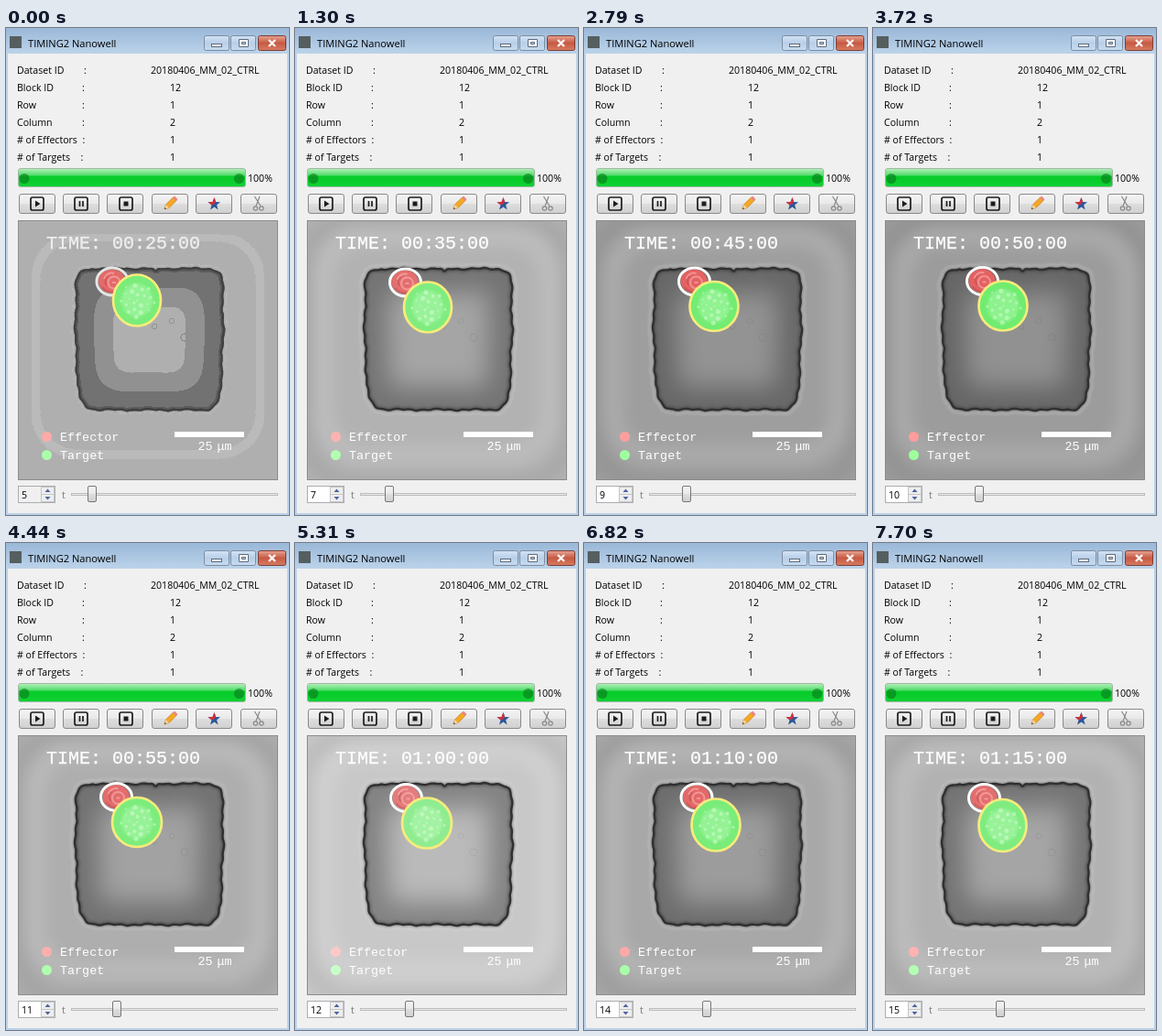
Write an HTML page that moves like this. It is 309 px wide and 532 px high and loops after 8 s.

```html
<!DOCTYPE html>
<html lang="en">
<head>
<meta charset="utf-8">
<title>Nanowell viewer</title>
<style>
  html, body { margin: 0; width: 100%; height: 100%; overflow: hidden; background: #f0f0f0; }
  svg { display: block; width: 309px; height: 532px; }
  text { font: 10.6px "Open Sans", sans-serif; fill: #000; white-space: pre; }
  .mono text { font: 13.4px "Liberation Mono", monospace; fill: #fff; }
  .mono #clock { font-size: 20px; stroke: #fff; stroke-width: .25; }
</style>
</head>
<body>
<svg viewBox="0 0 309 532">
  <defs>
    <linearGradient id="titleFill" x2="0" y2="1">
      <stop stop-color="#9ab8d8"/><stop offset="1" stop-color="#bcd3ea"/>
    </linearGradient>
    <linearGradient id="blueButton" x2="0" y2="1">
      <stop stop-color="#d5e4f4"/><stop offset=".5" stop-color="#b8cfe8"/><stop offset="1" stop-color="#c8dcf0"/>
    </linearGradient>
    <linearGradient id="redButton" x2="0" y2="1">
      <stop stop-color="#e7a493"/><stop offset=".5" stop-color="#c75a43"/><stop offset="1" stop-color="#d67c62"/>
    </linearGradient>
    <linearGradient id="grayButton" x2="0" y2="1">
      <stop stop-color="#f4f4f4"/><stop offset=".5" stop-color="#e9e9e9"/><stop offset=".52" stop-color="#dddddd"/><stop offset="1" stop-color="#d0d0d0"/>
    </linearGradient>
    <linearGradient id="barFill" x2="0" y2="1">
      <stop stop-color="#b5f0bd"/><stop offset=".38" stop-color="#50dc68"/><stop offset=".42" stop-color="#06cc28"/><stop offset="1" stop-color="#10d034"/>
    </linearGradient>
    <filter id="hazy" x="-10%" y="-10%" width="120%" height="120%"><feGaussianBlur stdDeviation=".6"/></filter>
    <filter id="soft" x="-10%" y="-10%" width="120%" height="120%"><feGaussianBlur stdDeviation="1.6"/></filter>
    <filter id="softer" x="-15%" y="-15%" width="130%" height="130%"><feGaussianBlur stdDeviation="8"/></filter>
    <filter id="softest" x="-40%" y="-40%" width="180%" height="180%"><feGaussianBlur stdDeviation="14"/></filter>
    <filter id="banded" color-interpolation-filters="sRGB">
      <feComponentTransfer>
        <feFuncR type="discrete" tableValues=".2 .25 .3 .36 .45 .57 .69 .73 .78 .85"/>
        <feFuncG type="discrete" tableValues=".2 .25 .3 .36 .45 .57 .69 .73 .78 .85"/>
        <feFuncB type="discrete" tableValues=".2 .25 .3 .36 .45 .57 .69 .73 .78 .85"/>
      </feComponentTransfer>
    </filter>
    <clipPath id="view"><rect x="14" y="211" width="282" height="282"/></clipPath>
    <clipPath id="inWell"><path class="well"/></clipPath>
    <path id="wellBase" d="M94 263H220Q236 263 236 279L237 330 234 398Q232 417 214 417H104Q82 417 79 396L76 335 77 280Q78 263 94 263Z"/>
  </defs>

  <!-- window -->
  <rect width="309" height="532" fill="#b9d1ea"/>
  <rect width="309" height="28" fill="url(#titleFill)"/>
  <rect x="2" y="28" width="305" height="502" fill="#f0f0f0"/>
  <rect x="4" y="9" width="13" height="13" fill="#555f5f"/>
  <text x="24" y="21" style="font-size:11.1px">TIMING2 Nanowell</text>
  <g stroke="#7b8da3">
    <rect x="216.500" y="8.500" width="27" height="16" rx="2" fill="url(#blueButton)"/>
    <rect x="245.500" y="8.500" width="27" height="16" rx="2" fill="url(#blueButton)"/>
    <rect x="275.500" y="8.500" width="30" height="16" rx="2" fill="url(#redButton)" stroke="#7f3d33"/>
  </g>
  <rect x="224.500" y="17.500" width="11" height="3" fill="#fff" stroke="#5d6b7c"/>
  <path d="M254.500 12.500h10v8h-10zM257.500 15.500h4v2h-4z" fill="#fff" fill-rule="evenodd" stroke="#5d6b7c"/>
  <path d="M287 13l7 7m0-7l-7 7" stroke="#fff" stroke-width="2.200"/>

  <g id="info"></g>

  <!-- progress -->
  <rect x="13.500" y="153.500" width="248" height="20" rx="2.500" fill="url(#barFill)" stroke="#a4b8a7"/>
  <g fill="#087f1d" opacity=".65" filter="url(#hazy)">
    <ellipse cx="20" cy="164.500" rx="5.500" ry="5.500"/><ellipse cx="254.500" cy="164.500" rx="5.500" ry="5.500"/>
  </g>
  <text x="264" y="168">100%</text>

  <!-- toolbar -->
  <g id="buttons"></g>
  <g fill="none" stroke="#1c1c1c" stroke-width="1.700">
    <rect x="27" y="185" width="14" height="14" rx="2"/>
    <rect x="75" y="185" width="14" height="14" rx="2"/>
    <rect x="124" y="185" width="14" height="14" rx="2"/>
    <path d="M80.500 189v6m3.500-6v6"/>
  </g>
  <path d="M32 188.500l5.500 3.500-5.500 3.500zM128.500 189.500h5v5h-5z" fill="#1c1c1c"/>
  <path d="M173 198l1.500-5 8-8 3.500 3.500-8 8z" fill="#f7a823" stroke="#b97818" stroke-width=".7"/>
  <path d="M182 185.500l2-2 3.500 3.500-2 2z" fill="#e98484"/>
  <path d="M173 198l1.500-5 3.500 3.500z" fill="#f0d2a0"/><path d="M173 198l.6-2 1.400 1.400z" fill="#333"/>
  <path d="M227.500 185l1.600 5 5 .2-4 3 1.500 5.300-4.100-3-4.500 3 1.500-5.300-4-3 5-.2z" fill="#2b5797"/>
  <path d="M227.500 185l1.600 5-2 2.500-2.600.7-4-3 5-.2z" fill="#d22f3c"/>
  <g fill="none" stroke="#888" stroke-width="1.200">
    <path d="M271.500 184l6.500 10.500m-1-10.500l-4 10.500"/>
    <circle cx="272.500" cy="197" r="2.200"/><circle cx="279" cy="197" r="2.200"/>
  </g>

  <!-- microscope view -->
  <rect x="13.500" y="210.500" width="283" height="283" fill="#aaa" stroke="#8c8c8c"/>
  <g clip-path="url(#view)">
    <g id="field">
      <rect id="ground" x="14" y="211" width="282" height="282"/>
      <rect x="10" y="207" width="290" height="290" rx="55" fill="none" stroke="#000" stroke-width="12" opacity=".08" filter="url(#softer)"/>
      <rect x="32" y="228" width="246" height="238" rx="45" fill="none" stroke="#fff" stroke-width="22" opacity=".13" filter="url(#softer)"/>
      <path class="well" fill="none" stroke="#fff" stroke-width="9" opacity=".35" filter="url(#soft)"/>
      <path id="floor" class="well"/>
      <g clip-path="url(#inWell)">
        <path class="well" fill-opacity=".07"/>
        <path class="well" fill="none" stroke="#000" stroke-width="48" opacity=".3" filter="url(#softest)"/>
      </g>
      <path class="well" fill="none" stroke="#222" stroke-width="5" opacity=".4" filter="url(#soft)"/>
      <path class="well" fill="none" stroke="#303030" stroke-width="2.400" filter="url(#hazy)"/>
      <g fill="none" stroke="#000" opacity=".06">
        <circle cx="195" cy="338" r="4"/><circle cx="181" cy="320" r="3"/><circle cx="162" cy="326" r="3"/>
      </g>
    </g>
    <g id="effector">
      <ellipse class="body" cx="-.5" cy="-.5" rx="14.500" ry="13"/>
      <g fill="none" stroke="#ffc4c4" stroke-width="2" opacity=".5" filter="url(#hazy)">
        <circle cx="2" cy="1" r="6.500"/><path d="M-9-3q4-8 11-6M0 1h4"/>
      </g>
      <path d="M-11 6q6 7 14 5M-5-6q-5 5-1 10" fill="none" stroke="#a53c3c" stroke-width="1.500" opacity=".4" filter="url(#hazy)"/>
      <ellipse class="rim" rx="17" ry="15" fill="none" stroke="#fff" stroke-width="3"/>
    </g>
    <g id="target">
      <ellipse class="body" rx="26" ry="27"/>
      <ellipse rx="17" ry="18" fill="#c8ffc8" opacity=".35" filter="url(#soft)"/>
      <g id="specks" fill="#e0ffe0" opacity=".45" filter="url(#hazy)"></g>
      <ellipse class="rim" rx="26" ry="27" fill="none" stroke="#f7ec7c" stroke-width="2.700"/>
    </g>
    <g class="mono">
      <text id="clock" x="44" y="241"></text>
      <circle id="redDot" cx="44.500" cy="446.500" r="5.500"/>
      <circle id="greenDot" cx="44.500" cy="466.500" r="5.500"/>
      <text x="59" y="451">Effector</text>
      <text x="59" y="471">Target</text>
      <rect x="184" y="441" width="76" height="6" fill="#fff"/>
      <text x="209.500" y="461">25</text><text x="230.500" y="461">μm</text>
    </g>
  </g>

  <!-- step selector -->
  <rect id="stepBox" x="13.500" y="500.500" width="40" height="18" stroke="#abadb3"/>
  <g fill="#eee" stroke="#c5c5c5">
    <rect x="38.500" y="501.500" width="14" height="8"/><rect x="38.500" y="509.500" width="14" height="8"/>
  </g>
  <path d="M42.500 507l3-3.500 3 3.500zM42.500 512l3 3.500 3-3.500z" fill="#4c62a0"/>
  <text id="step" x="17" y="514"></text>
  <text x="61" y="514" style="fill:#777">t</text>
  <rect x="71.500" y="508.500" width="225" height="2" fill="#e7eaea" stroke="#bcbcbc"/>
  <rect id="handle" y="500.500" width="9" height="17" rx="1.500" fill="url(#grayButton)" stroke="#777"/>
</svg>
<script>
const $ = selector => document.querySelector(selector);
const LOOP = 8000, FIRST_STEP = 5, MINUTES_PER_STEP = 5;

// start ms, gray level, effector x y, target x y, target radii
const steps = [
  [0, 170, 116, 277, 143, 297.5, 26, 28],
  [430, 172, 118, 277.5, 144, 301.5, 26, 28],
  [1300, 178, 120.5, 278, 145, 305, 26, 27.5],
  [2020, 162, 121.5, 277, 141.5, 304.5, 26.5, 27],
  [2790, 158, 120.5, 277, 142, 304, 26.5, 27],
  [3720, 156, 119.5, 276.5, 142, 303.5, 26.5, 27],
  [4440, 174, 120.5, 277.5, 143, 305, 27, 27],
  [5310, 200, 121.5, 278.5, 144, 306, 27, 27.5],
  [6050, 158, 124.5, 277.5, 146, 307, 27, 28],
  [6820, 168, 123, 278, 144, 308, 26.5, 28.5],
  [7700, 178, 121.5, 278.5, 141.5, 308.5, 26, 28.5]
];

const infoRows = [
  ["Dataset ID", 85, "20180406_MM_02_CTRL", 158],
  ["Block ID", 83, "12", 179],
  ["Row", 83, "1", 179],
  ["Column", 83, "2", 179],
  ["# of Effectors", 83.5, "1", 179],
  ["# of Targets", 81.5, "1", 179]
];
$("#info").innerHTML = infoRows.map(([label, colonX, value, valueX], i) => {
  const y = 50 + 19 * i;
  return `<text x="12" y="${y}">${label}</text><text x="${colonX}" y="${y}">:</text><text x="${valueX}" y="${y}">${value}</text>`;
}).join("");

$("#buttons").innerHTML = Array.from({ length: 6 }, (_, i) =>
  `<rect x="${Math.floor(14 + 48.4 * i) + 0.5}" y="181.5" width="39" height="21" rx="2.5" fill="url(#grayButton)" stroke="#8a8a8a"/>`
).join("");

// Roughen the rounded square into an etched edge.
function roughOutline(base) {
  const length = base.getTotalLength(), points = [];
  for (let s = 0; s < length; s += 2) {
    const p = base.getPointAtLength(s);
    const notch = 4 * Math.exp(-(((p.x - 163) / 3) ** 2)) * (p.y < 280);
    const dx = 0.7 * Math.sin(s * 0.13) + 0.5 * Math.sin(s * 0.41);
    const dy = 0.6 * Math.sin(s * 0.15 + 1) + 0.5 * Math.sin(s * 0.43) + notch;
    points.push(`${(p.x + dx).toFixed(1)} ${(p.y + dy).toFixed(1)}`);
  }
  return `M${points.join("L")}Z`;
}
const outline = roughOutline($("#wellBase"));
document.querySelectorAll(".well").forEach(path => path.setAttribute("d", outline));

$("#specks").innerHTML = Array.from({ length: 22 }, (_, i) => {
  const angle = i * 2.4, radius = 4.2 * Math.sqrt(i);
  return `<circle cx="${radius * Math.cos(angle)}" cy="${radius * Math.sin(angle)}" r="${1 + i % 4 * 0.5}"/>`;
}).join("");

const rgb = (...channels) => `rgb(${channels.map(Math.round)})`;
const set = (selector, attributes) => {
  for (const name in attributes) $(selector).setAttribute(name, attributes[name]);
};
const pad = n => String(n).padStart(2, "0");

let shown = -1;
function show(index) {
  if (index === shown) return;
  shown = index;
  const [, gray, ex, ey, tx, ty, rx, ry] = steps[index];
  const step = FIRST_STEP + index, minutes = step * MINUTES_PER_STEP;
  const faded = index === 0;

  set("#field", { filter: faded ? "url(#banded)" : "none" });
  set("#ground", { fill: rgb(gray, gray, gray) });
  set("#floor", { fill: rgb(gray, gray, gray) });
  set("#redDot", { fill: rgb(255, gray, gray) });
  set("#greenDot", { fill: rgb(gray, 255, gray) });

  set("#effector", { transform: `translate(${ex} ${ey})` });
  set("#effector .body", { fill: rgb(228, gray * 0.62, gray * 0.62) });
  set("#effector .rim", { stroke: faded ? "#e6e6e6" : "#fff" });
  set("#target", { transform: `translate(${tx} ${ty})` });
  set("#target .body", { rx, ry, fill: rgb(gray * 0.72, 236, gray * 0.72) });
  set("#target .rim", { rx, ry });

  $("#clock").textContent = `TIME: ${pad(Math.floor(minutes / 60))}:${pad(minutes % 60)}:00`;
  $("#clock").style.fill = faded ? "#ececec" : "#fff";
  $("#step").textContent = step;
  set("#stepBox", { fill: faded ? "#f0f0f0" : "#fff" });
  set("#handle", { x: Math.floor(89 + 4.5 * index) + 0.5 });
}

function tick() {
  const time = performance.now() % LOOP;
  show(steps.findLastIndex(([start]) => time >= start));
  requestAnimationFrame(tick);
}
tick();
</script>
</body>
</html>
```
